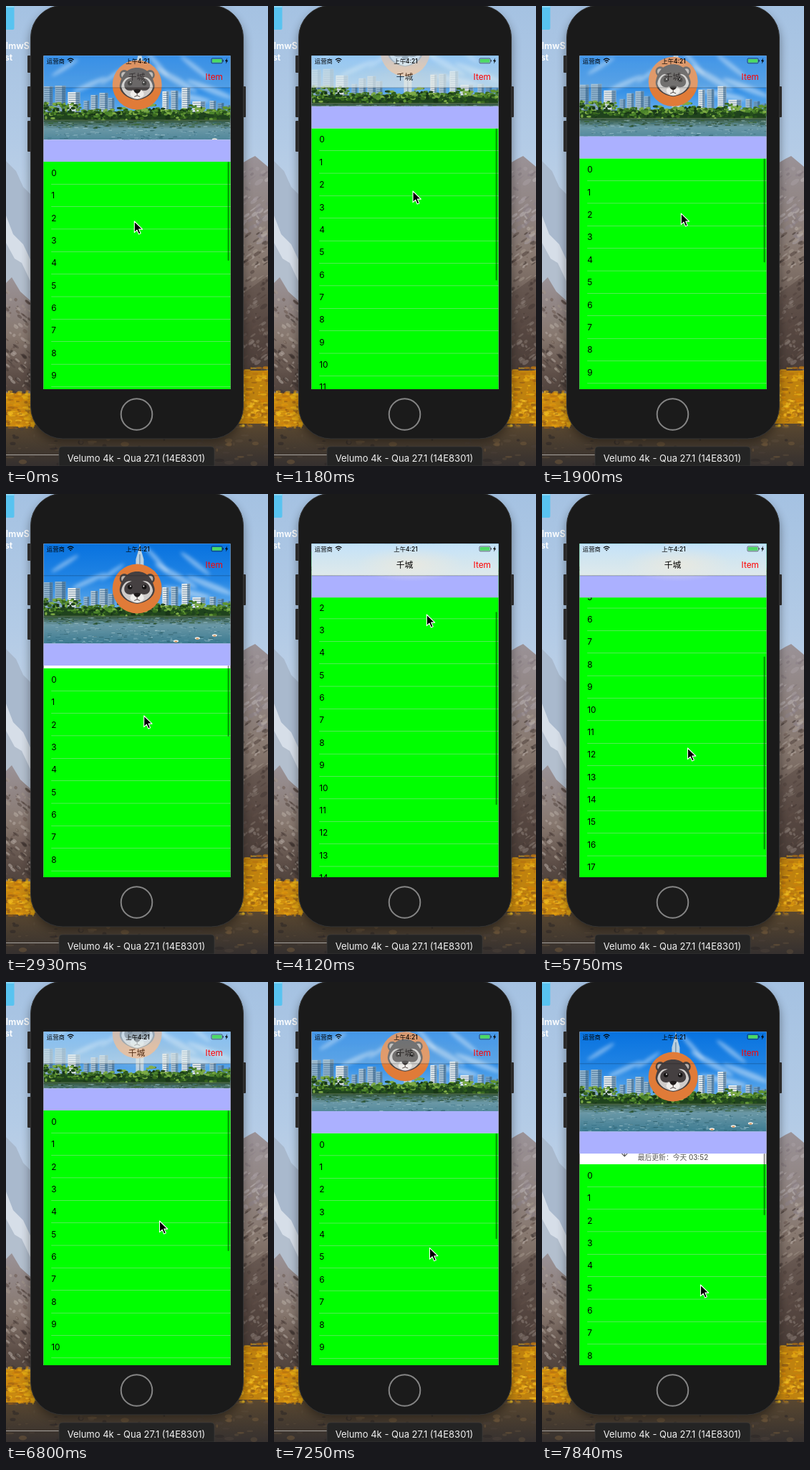
An HTML page that plays this animation: 366 px wide and 641 px high, repeating every 7.99 s.

```html
<!DOCTYPE html>
<html lang="zh">
<head>
<meta charset="utf-8">
<title>Pull-down list</title>
<style>
html, body { margin: 0; width: 100%; height: 100%; overflow: hidden; background: #1a1a1a; }
svg { display: block; width: 100%; height: 100%; }
text { font-family: Inter, "Noto Sans CJK SC", "Noto Sans CJK", sans-serif; }
.row { font-size: 11.85px; }
.status { font-size: 8.4px; font-weight: 500; }
.hint { font-size: 9.8px; font-weight: 500; fill: #5a5a5a; }
.desk { font-size: 12.5px; font-weight: 600; fill: #fff; }
</style>
</head>
<body>
<svg id="stage" viewBox="0 0 366 641" preserveAspectRatio="none">
  <defs>
    <linearGradient id="dusk" x2="0" y2="1">
      <stop offset="0" stop-color="#a5c2e2"/><stop offset=".3" stop-color="#b3cbe6"/>
      <stop offset=".6" stop-color="#cbd8e6"/>
    </linearGradient>
    <linearGradient id="rock" x2="0" y2="1">
      <stop offset="0" stop-color="#9a9297"/><stop offset=".45" stop-color="#87786f"/>
      <stop offset=".75" stop-color="#5d4e47"/><stop offset="1" stop-color="#453a35"/>
    </linearGradient>
    <linearGradient id="ground" x2="0" y2="1">
      <stop offset="0" stop-color="#5c4930"/><stop offset="1" stop-color="#35302f"/>
    </linearGradient>
    <linearGradient id="sky" x2="0" y2="1">
      <stop offset="0" stop-color="#0872df"/><stop offset=".5" stop-color="#2285e4"/>
      <stop offset="1" stop-color="#79b9ee"/>
    </linearGradient>
    <linearGradient id="water" x2="0" y2="1">
      <stop offset="0" stop-color="#34563c"/><stop offset=".3" stop-color="#6b98a6"/>
      <stop offset="1" stop-color="#3a7990"/>
    </linearGradient>
    <linearGradient id="frost" x2="0" y2="1">
      <stop offset="0" stop-color="#c3e2fa"/><stop offset=".55" stop-color="#d3e6ef"/>
      <stop offset="1" stop-color="#dfe9eb"/>
    </linearGradient>
    <radialGradient id="cream">
      <stop offset="0" stop-color="#eee9dc" stop-opacity=".75"/><stop offset="1" stop-color="#eee9dc" stop-opacity="0"/>
    </radialGradient>
    <filter id="soft" x="-20%" y="-20%" width="140%" height="140%"><feGaussianBlur stdDeviation="7"/></filter>
    <filter id="wisp"><feGaussianBlur stdDeviation="2.4"/></filter>
    <clipPath id="screen"><rect x="52.5" y="69.3" width="261" height="464.7"/></clipPath>
    <clipPath id="photo"><rect id="crop" x="52.4" y="69" width="261.4" height="139.4"/></clipPath>
  </defs>

  <g id="desktop"></g>

  <rect x="34" y="6" width="298" height="602" rx="46" fill="#000" opacity=".4" filter="url(#soft)"/>
  <g fill="#2b2a2a">
    <rect x="30" y="69" width="7" height="24" rx="1"/>
    <rect x="30" y="112" width="7" height="43" rx="1"/>
    <rect x="30" y="160" width="7" height="43" rx="1"/>
    <rect x="329" y="112" width="6" height="43" rx="1"/>
  </g>
  <rect x="34.5" y="-1" width="297" height="604" rx="45" fill="#1a1a1a" stroke="#343434"/>
  <circle cx="182.5" cy="569" r="21.8" fill="#1b1b1b" stroke="#858585" stroke-width="2"/>

  <g clip-path="url(#screen)">
    <rect x="52" y="69" width="262" height="465" fill="#fff"/>
    <g id="list"></g>
    <rect id="bar" x="309.6" width="2.2" rx="1.1" fill="#000" opacity=".4"/>
    <g clip-path="url(#photo)"><g id="lake"></g></g>
    <g id="head">
      <g id="avatar" transform="translate(183.2 132)"></g>
      <rect x="52" y="208.4" width="262" height="30.7" fill="#abb0ff"/>
    </g>
    <g id="nav">
      <rect x="52" y="69" width="262" height="44.8" fill="url(#frost)"/>
      <ellipse cx="190" cy="98" rx="75" ry="24" fill="url(#cream)"/>
      <text class="row" x="182.5" y="103.2" text-anchor="middle">千城</text>
    </g>
    <rect x="52" y="113.6" width="262" height=".6" fill="#000" opacity=".4"/>
    <text class="row" x="278.6" y="103.3" fill="#f00">Item</text>
    <text class="status" x="56.8" y="79.6">运营商</text>
    <text class="status" x="184" y="79.7" text-anchor="middle">上午4:21</text>
    <path d="M86 74.9Q90.2 71.3 94.4 74.9M87.7 77Q90.2 74.9 92.7 77" fill="none" stroke="#000" stroke-width="1.3"/>
    <path d="M88.9 78.2Q90.2 77.1 91.5 78.2L90.2 79.6Z"/>
    <rect x="287" y="73" width="15.2" height="6.8" rx="1.4" fill="none" stroke="#111" stroke-width=".6"/>
    <rect x="288" y="74" width="13.2" height="4.8" rx=".6" fill="#4cd964"/>
    <path d="M302.8 75.2h.8v2.4h-.8zM309 72.5L306 77h1.8L307 80.5L310.2 75.8h-1.9Z"/>
  </g>

  <path d="M74 641V619Q74 614 79 614H286Q291 614 291 619V641Z" fill="#242424" stroke="#3c3c3c" stroke-width=".7"/>
  <text x="182" y="634.6" text-anchor="middle" font-size="13" fill="#f2f2f2">Velumo 4k - Qua 27.1 (14E8301)</text>

  <path id="cursor" d="M0 0V15.6L3.7 12.1L6.2 18L8.9 16.8L6.4 11.1H11.4Z" stroke="#fff" stroke-width="1.1" stroke-linejoin="round"/>
</svg>
<script>
const $ = id => document.getElementById(id);
const LOOP = 7990, ROWS = 20, ROW_H = 31.37, PHOTO_H = 139.4;
const OPEN = 239.1, SHUT = 144.3;   // lower edge of the strip, expanded and collapsed

let seed = 7;
const rnd = (a = 0, b = 1) => {
  seed = (seed * 16807) % 2147483647;
  return a + (b - a) * seed / 2147483647;
};
const pick = list => list[Math.floor(rnd(0, list.length))];
const repeat = (n, fn) => Array.from({ length: n }, (_, i) => fn(i)).join('');
const rect = (x, y, w, h, fill, more = '') =>
  `<rect x="${x}" y="${y}" width="${w}" height="${h}" fill="${fill}" ${more}/>`;
const oval = (x, y, rx, ry, fill, more = '') =>
  `<ellipse cx="${x}" cy="${y}" rx="${rx}" ry="${ry}" fill="${fill}" ${more}/>`;
const path = (d, fill, more = '') => `<path d="${d}" fill="${fill}" ${more}/>`;

function drawDesktop() {
  const specks = (n, x0, x1, y0, y1, colors, size, tilt = 0) => repeat(n, () => {
    const x = rnd(x0, x1), y = rnd(y0, y1);
    return oval(x, y, rnd(1, size), rnd(.7, size * .5), pick(colors),
      `opacity=".55" transform="rotate(${tilt} ${x} ${y})"`);
  });
  const stone = ['#a3958b', '#54453f', '#b5a9a2', '#6b5a51', '#3f3431'];
  const leaves = ['#f4bd16', '#e39a0c', '#ffce2b', '#b06c10', '#85521a', '#cf7f0a'];
  $('desktop').innerHTML =
    rect(0, 0, 366, 641, 'url(#dusk)') +
    path('M0 216L14 230L24 252L40 268V470H0Z', '#a9b9cd') +
    path('M0 292L10 318L24 332L40 366V440H0Z', '#d6dee8') +
    path('M0 330L12 352L22 358L40 396V440H0Z', '#b3bfce') +
    path('M0 386L8 378L20 398L40 416V560H0Z', 'url(#rock)') +
    specks(110, 0, 38, 398, 540, stone, 5, 40) +
    path('M325 222L340 213L348 209L366 224V530H325Z', 'url(#rock)') +
    specks(60, 328, 366, 226, 330, ['#bcb4b6', '#7d7378', '#a79ea2', '#8d8288'], 7, -35) +
    specks(150, 328, 366, 310, 510, stone, 6, -35) +
    path('M325 405L366 376V520H325Z', '#4d3e38', 'opacity=".4"') +
    rect(0, 578, 366, 63, 'url(#ground)') +
    rect(0, 540, 40, 46, '#c98a12') + rect(325, 508, 41, 74, '#bf820f') +
    specks(110, 0, 40, 536, 588, leaves, 5) +
    specks(150, 326, 366, 504, 586, leaves, 5) +
    specks(110, 0, 366, 584, 640, ['#6f573a', '#2b2727', '#4b4038', '#5a4a3a'], 7) +
    rect(0, 625, 74, 1, '#c9c6c2', 'opacity=".75"') +
    rect(-8, -4, 19.5, 37, '#58c3f0', 'rx="2"') + rect(-8, -4, 19.5, 6, '#8ad8f7') +
    '<text class="desk" x="33" y="60" text-anchor="end">lmwS</text><text class="desk" x="-2" y="76">st</text>';
}

function tower(x, y, w, h, wall) {
  const bands = repeat(Math.floor(h / 3), i => rect(x + 1, y + 2 + i * 3, w - 2, 1, '#41688a', 'opacity=".6"'));
  return rect(x, y, w, h, wall) + bands + rect(x + w * .65, y, w * .35, h, '#2d5f8a', 'opacity=".6"');
}

function drawLake() {
  const walls = ['#dfe7eb', '#a9c2d4', '#8fb2cc', '#e6ebec', '#6c9cc2'];
  const blocks = [[0, 54, 13], [16, 53, 15], [34, 62, 17], [56, 74, 8], [66, 66, 10], [78, 63, 12],
    [90, 70, 9], [166, 61, 9], [178, 60, 10], [193, 56, 12], [208, 75, 18], [232, 74, 9], [243, 77, 9], [254, 80, 7]];
  const lit = ['#5f9433', '#4c842b', '#7dab45', '#39681f'];
  const dark = ['#1f431d', '#26501c', '#173517', '#315f1c'];
  const canopy = x => x < 52 ? 77 : x < 105 ? 86 : 83 + 4 * Math.sin(x / 9);
  const leaf = (x, y, greens) => oval(x, y, rnd(1.2, 3.6), rnd(1, 2.4), pick(greens));
  const cloud = (x, y, w, tilt) =>
    oval(x, y, w, w * .13, '#fff', `opacity=".42" transform="rotate(${tilt} ${x} ${y})"`);
  $('lake').innerHTML = '<g transform="translate(52.4 69)">' +
    rect(0, 0, 262, 102, 'url(#sky)') +
    '<g filter="url(#wisp)">' +
    cloud(30, 28, 22, -32) + cloud(64, 52, 26, -24) + cloud(158, 22, 24, 48) + cloud(185, 45, 34, 30) +
    cloud(212, 28, 26, 38) + cloud(232, 58, 34, 22) + cloud(96, 40, 20, -35) + cloud(200, 68, 34, 12) + '</g>' +
    blocks.map(([x, y, w]) => tower(x, y, w, 96 - y, pick(walls))).join('') +
    path('M129 96V22L133 8L134.5 0L136 8L140 22V96Z', '#b9cfdf') + rect(134, 15, 1, 80, '#54799a') +
    rect(0, 90, 262, 12, '#1f431d') +
    repeat(260, () => { const x = rnd(-2, 264); return leaf(x, rnd(canopy(x), 94), lit); }) +
    repeat(260, () => { const x = rnd(-2, 264); return leaf(x, rnd(canopy(x) + 3, 101), rnd() < .3 ? lit : dark); }) +
    rect(0, 100.8, 262, .9, '#b5b49a', 'opacity=".6"') +
    rect(0, 101.5, 262, 39, 'url(#water)') +
    repeat(70, () => rect(rnd(-5, 262), rnd(101.5, 112), rnd(2, 9), rnd(.8, 1.6), pick(dark), 'opacity=".6"')) +
    repeat(420, () => rect(rnd(-5, 262), rnd(103, 139), rnd(1, 7), rnd(.5, 1.1),
      pick(['#b9d5dd', '#204f55', '#5d94a8', '#2a6378', '#86b2c2']), 'opacity=".6"')) +
    [[185, 136], [215, 132], [239, 128]].map(([x, y]) =>
      oval(x, y, 3.6, 1.7, '#f2efe7') + oval(x, y + .7, 2, .9, '#d48b4e')).join('') + '</g>';
}

function drawAvatar() {
  const pair = (x, y, rx, ry, fill) => oval(-x, y, rx, ry, fill) + oval(x, y, rx, ry, fill);
  $('avatar').innerHTML =
    oval(0, 0, 34.5, 34.5, '#e07b38') +
    pair(18, -14, 6.6, 7, '#4a4341') + pair(18.5, -14, 3.6, 4, '#b9b2ae') +
    path('M0 -24C14 -24 21 -14 24 -2C27 8 16 19 0 21C-16 19 -27 8 -24 -2C-21 -14 -14 -24 0 -24Z', '#454041') +
    path('M-5 -9C-13 -14 -21 -7 -22 3C-20 13 -9 19 0 20C9 19 20 13 22 3C21 -7 13 -14 5 -9L0 -4Z', '#cfccca') +
    path('M0 -12C5 -11 17 -10 18 0C18 8 10 9 6 7L4 12H-4L-6 7C-10 9 -18 8 -18 0C-17 -10 -5 -11 0 -12Z', '#454041') +
    path('M-5 7Q-11 10 -9 15Q-5 19 0 19Q5 19 9 15Q11 10 5 7L0 9Z', '#efedea') +
    pair(10, -2.4, 3.2, 3.2, '#141212') + pair(9.2, -3.5, .9, .9, '#fff') +
    path('M-5 7Q0 4.5 5 7Q4 11 0 12Q-4 11 -5 7Z', '#1f1b1b') +
    path('M0 11V15M-4 16.5Q0 13.5 4 16.5', 'none', 'stroke="#514846"');
}

function drawList() {
  $('list').innerHTML =
    '<text class="hint" x="183" y="-24.5" text-anchor="middle">下拉可以刷新</text>' +
    '<text class="hint" x="183" y="-5.8" text-anchor="middle">最后更新：今天 03:52</text>' +
    path('M115.3 -28V-11.2M111.3 -15.2L115.3 -11.2L119.3 -15.2', 'none', 'stroke="#555" stroke-width="1.2"') +
    rect(52, 0, 262, ROWS * ROW_H, '#0f0') +
    repeat(ROWS, i => `<text class="row" x="63.2" y="${i * ROW_H + 19.9}">${i}</text>` +
      rect(63.2, (i + 1) * ROW_H - .4, 251, .4, '#d2cbd6'));
}

// first change, last change, number of changes
const beats = [[0, 0, 1], [150, 1180, 8], [1320, 2340, 8], [2490, 2490, 1], [2790, 3520, 6], [3820, 4720, 7],
  [4870, 4870, 1], [5160, 5750, 5], [6050, 6950, 7], [7100, 7840, 6]];
const ticks = beats.flatMap(([a, b, n]) =>
  Array.from({ length: n }, (_, i) => Math.floor((a + (b - a) * i / Math.max(1, n - 1)) / 10) * 10));

// time, top of the list, cursor x, cursor y
const moves = [
  [0, 217, 179.3, 300], [1180, 170.5, 194, 258], [2340, 238, 194.5, 308], [2490, 252, 195, 322],
  [2790, 249, 194, 317], [2930, 243, 192.7, 309], [3520, 108, 209, 196], [3820, 100, 211, 186],
  [4120, 80, 213.3, 168], [4400, 20, 213, 150], [4720, -72, 209, 230], [4870, -88, 207, 270],
  [5160, -102, 206, 282], [5750, -29, 203.5, 354], [6350, 70, 206, 264], [6800, 179, 214.5, 333],
  [7840, 254, 221.5, 422]];
// top of the list, length of the scroll bar
const barSizes = [[137, 269], [170.5, 212], [179, 196], [217, 138], [243, 99], [254, 86]];

const clamp = (v, lo, hi) => Math.min(hi, Math.max(lo, v));

function sample(keys, t) {
  const i = keys.findIndex(k => k[0] > t);
  if (i === 0) return keys[0].slice(1);
  if (i < 0) return keys[keys.length - 1].slice(1);
  const a = keys[i - 1], b = keys[i], p = (t - a[0]) / (b[0] - a[0]);
  return a.slice(1).map((v, j) => v + (b[j + 1] - v) * p);
}

function render(t) {
  const tick = ticks.filter(v => v <= t).pop();
  const [top, x, y] = sample(moves, tick);
  const edge = clamp(top, SHUT, OPEN), fold = OPEN - edge;
  const shift = (id, dx, dy) => $(id).setAttribute('transform', `translate(${dx} ${dy})`);
  shift('list', 0, top);
  shift('head', 0, -fold);
  shift('lake', 0, -fold / 2);   // the photo stays centred in its shrinking frame
  shift('cursor', x, y);
  $('crop').setAttribute('height', PHOTO_H - fold);
  $('nav').setAttribute('opacity', fold / (OPEN - SHUT));
  $('bar').setAttribute('y', edge + Math.max(0, 115 - top) * .57);
  $('bar').setAttribute('height', sample(barSizes, top)[0]);
}

drawDesktop();
drawLake();
drawAvatar();
drawList();
const start = performance.now();
function loop() {
  render((performance.now() - start) % LOOP);
  requestAnimationFrame(loop);
}
loop();
</script>
</body>
</html>
```
